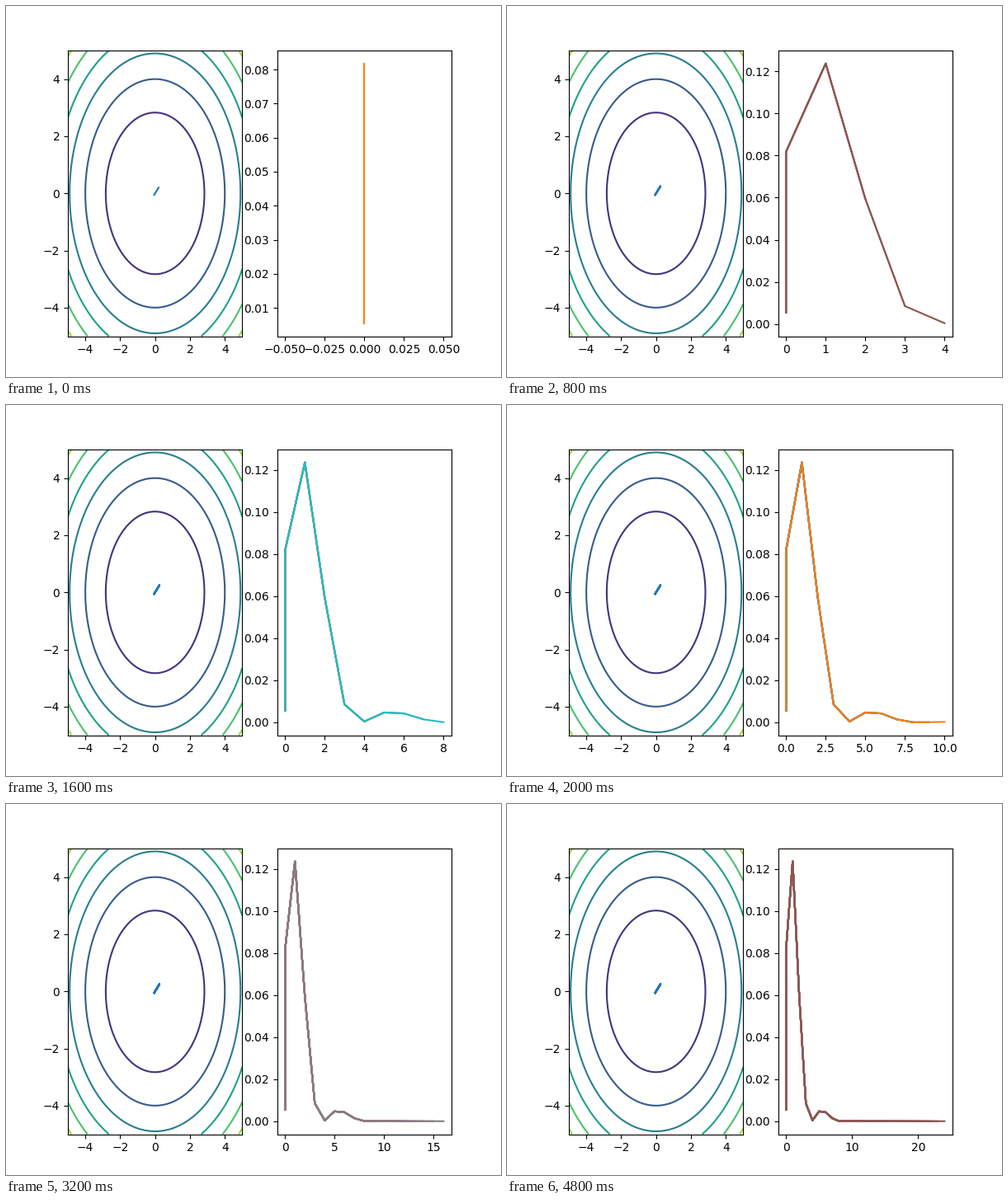
These frames come from a looping animation (600x450 px, 5000 ms). A matplotlib script:

```python
import matplotlib.pyplot as plt
import numpy as np
from matplotlib.animation import FuncAnimation

FRAMES = 25
INTERVAL = 200
MOMENTUM = 0.5
RATE = 0.2


def loss(x, y):
    return x**2 + y**2


def descend(start, velocity, steps):
    """Gradient descent with momentum along the diagonal x = y."""
    path = [start]
    for _ in range(steps):
        path.append(path[-1] + velocity)
        velocity = MOMENTUM * velocity - RATE * 2 * path[-1]
    return np.array(path)


path = descend(-0.0524, 0.2546, FRAMES)
values = loss(path, path)
steps = np.concatenate(([0], np.arange(FRAMES)))

fig, (ax_map, ax_loss) = plt.subplots(1, 2, figsize=(6, 4.5), dpi=100)
grid = np.linspace(-5, 5, 100)
X, Y = np.meshgrid(grid, grid)
ax_map.contour(X, Y, loss(X, Y))
trails = []


def update(frame):
    while trails:
        trails.pop().remove()
    ax_loss.clear()
    # Every step lays a longer curve over the earlier ones.
    for count in range(2, frame + 3):
        trails.extend(ax_map.plot(path[:count], path[:count], color="C0"))
        ax_loss.plot(steps[:count], values[:count], color=f"C{(count - 1) % 10}")
    ax_map.set(xlim=(-5, 5), ylim=(-5, 5))
    return []


anim = FuncAnimation(fig, update, frames=FRAMES, interval=INTERVAL,
                     init_func=lambda: update(0), repeat=True, repeat_delay=0)
plt.show()
```
